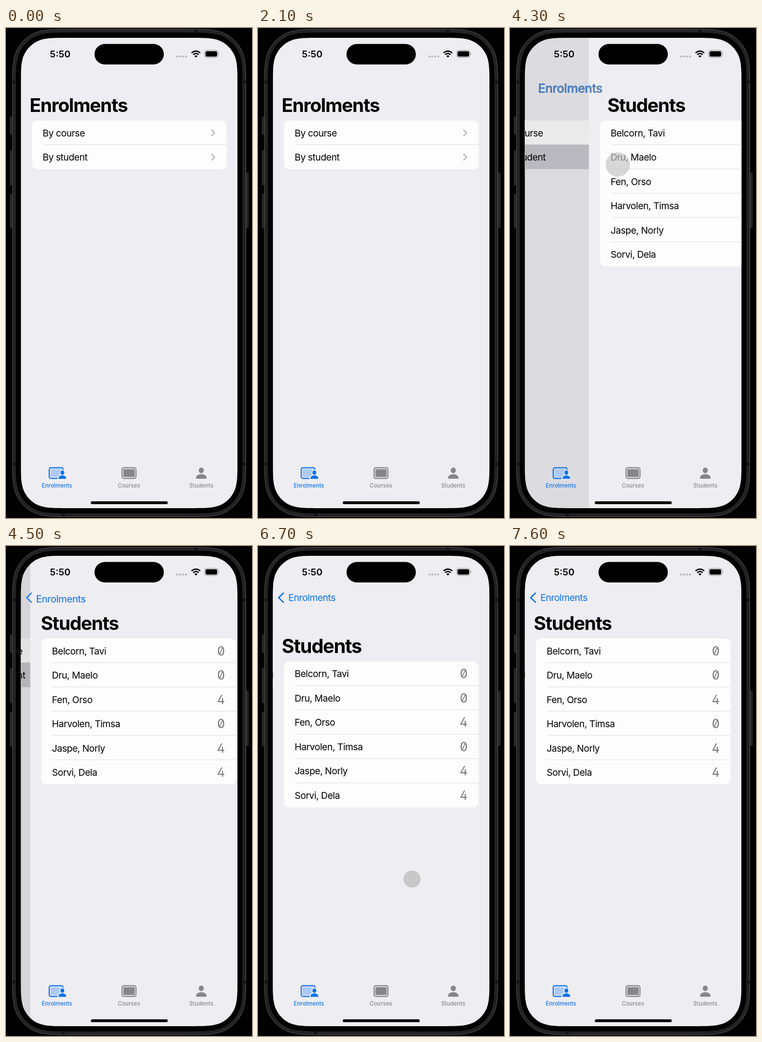
An HTML page for the animation above (8 s loop, 502 by 998 pixels).

```html
<!DOCTYPE html>
<html lang="en">
<head>
<meta charset="utf-8">
<title>Enrolments</title>
<style>
  html, body { margin: 0; width: 100%; height: 100%; overflow: hidden; background: #000; }
  svg { display: block; width: 502px; height: 998px; }
  text { font: 400 19.1px Inter, "Open Sans", sans-serif; font-optical-sizing: none; letter-spacing: -.5px; }
  .large { font-size: 38.2px; font-weight: 700; letter-spacing: -1.22px; }
  .clock { font-weight: 600; letter-spacing: 0; }
  .tab { font-size: 11.25px; font-weight: 500; letter-spacing: .15px; text-anchor: middle; }
  .count { font-size: 25px; fill: #77777a; text-anchor: middle; letter-spacing: 0; font-feature-settings: "zero", "cv02"; }
  .line { fill: none; stroke-linecap: round; stroke-linejoin: round; }
</style>
</head>
<body>
<svg id="stage" viewBox="0 0 502 998"></svg>
<script>
const LOOP = 8000, STEP = 100;
const BG = '#eeedf2', BLUE = '#0a72ea', GRAY = '#868689';
const SCREEN = { x: 30.3, y: 20, w: 442, h: 958 };
const ROW = 49.5, LIST_TOP = 188.5;
const students = [
  ['Belcorn, Tavi', 0], ['Dru, Maelo', 0], ['Fen, Orso', 4],
  ['Harvolen, Timsa', 0], ['Jaspe, Norly', 4], ['Sorvi, Dela', 4],
];

const rect = (x, y, w, h, r, fill, extra = '') =>
  `<rect x="${x}" y="${y}" width="${w}" height="${h}" rx="${r}" fill="${fill}" ${extra}/>`;
const label = (x, y, str, cls = '', fill = '#000') =>
  `<text x="${x}" y="${y}" class="${cls}" fill="${fill}">${str}</text>`;
const line = (d, color, width, extra = '') =>
  `<path class="line" d="${d}" stroke="${color}" stroke-width="${width}" ${extra}/>`;

// Rectangle with continuous-curvature corners; each corner is mirrored from one curve.
function squircle(x, y, w, h, r, fill, extra = '') {
  const far = 1.528 * r;
  const corner = (cx, cy, sx, sy, flip) => {
    const p = (a, b) => `${cx + sx * r * a} ${cy + sy * r * b}`;
    const at = (a, b) => flip ? p(b, a) : p(a, b);
    return `L${at(1.528, 0)}C${at(1.088, 0)} ${at(.868, 0)} ${at(.631, .075)}` +
      `C${at(.373, .169)} ${at(.169, .373)} ${at(.075, .631)}` +
      `C${at(0, .868)} ${at(0, 1.088)} ${at(0, 1.528)}`;
  };
  const d = `M${x + far} ${y}` + corner(x + w, y, -1, 1, false) + corner(x + w, y + h, -1, -1, true) +
    corner(x, y + h, 1, -1, false) + corner(x, y, 1, 1, true);
  return `<path d="${d}Z" fill="${fill}" ${extra}/>`;
}

function list(names, accessory, behind = '') {
  const rows = names.map((name, i) => {
    const top = LIST_TOP + i * ROW;
    const divider = i ? rect(75.5, top - 1, 374.5, 1, 0, '#dcdcdf') : '';
    return divider + label(74.7, top + 32, name) + accessory(top, i);
  });
  return rect(53, LIST_TOP, 397, names.length * ROW, 11, '#fdfdfd') + behind + rows.join('');
}

const page = content => rect(SCREEN.x, SCREEN.y, SCREEN.w, SCREEN.h, 0, BG) + content;
const chevron = top => line(`M419.8 ${top + 19.2}l5.8 5.8l-5.8 5.8`, '#b9b9bd', 2.5);
const count = (top, i) => label(419.8, top + 34, students[i][1], 'count');

const person = (x, y, scale, color, extra = '') =>
  `<g transform="translate(${x} ${y}) scale(${scale})" fill="${color}" ${extra}>
    <ellipse cy="-17" rx="5.2" ry="5.8"/>
    <path d="M-9.3 0Q-10.8 0-10.8-1.5C-10.8-6-6-9.3 0-9.3S10.8-6 10.8-1.5Q10.8 0 9.3 0Z"/>
  </g>`;

function phone() {
  const side = (x, y, h) => rect(x, y, 7, h, 1.5, '#242424', 'stroke="#3d3d3d" stroke-width=".8"');
  const bands = [[13.5, 107, 6, 6], [483.5, 107, 6, 6], [13.5, 885, 6, 6],
    [483.5, 885, 6, 6], [384, 3, 6, 6], [114, 989, 6, 6]];
  return side(8.5, 181, 36) + side(8.5, 249.5, 70) + side(8.5, 338.5, 69) + side(487.5, 295.5, 111) +
    squircle(13.2, 2.5, 476.3, 993, 79, '#222', 'stroke="#595959"') +
    bands.map(b => rect(...b, 0, '#111')).join('') +
    squircle(19.5, 8.8, 463.7, 980.4, 73, '#000', 'stroke="#333" stroke-width=".8"');
}

function statusBar() {
  const dots = [0, 1, 2, 3].map(i => rect(347.5 + i * 6, 56, 4, 4, 1.6, '#b9b9bd')).join('');
  const wifi = `<path d="M387.5 60.3l-3.1-3.3q3.1-2.6 6.2 0Z"/>` +
    line('M381.9 54.2q5.6-4.6 11.2 0', '#000', 2.6, 'style="stroke-linecap:butt"') +
    line('M378.6 50.7q8.9-7.2 17.8 0', '#000', 2.6, 'style="stroke-linecap:butt"');
  const battery = rect(405.3, 45.3, 27.5, 14.8, 4.8, 'none', 'stroke="#98989c" stroke-width="1.1"') +
    rect(407.2, 47.2, 23.7, 11, 3.2, '#000') +
    '<path d="M434.2 50.2q2.4 2.5 0 5Z" fill="#98989c"/>';
  return label(89.5, 60, '5:50', 'clock') + rect(180.6, 32.6, 141.5, 41.6, 20.8, '#000') + dots + wifi + battery;
}

function tabBar() {
  const board = (x, color, inner) =>
    rect(x + 1.2, 895.7, 28.4, 21.6, 3.4, 'none', `stroke="${color}" stroke-width="2.2"`) +
    rect(x + 3.8, 898.4, 23.2, 16.2, 1.2, inner);
  return board(87, BLUE, '#abcaf5') +
    person(115, 918.2, .74, BG, `stroke="${BG}" stroke-width="5.5"`) +
    person(115, 918.2, .74, BLUE) +
    board(235.6, GRAY, GRAY) + person(398.5, 918, 1, GRAY) +
    label(104, 936, 'Enrolments', 'tab', BLUE) +
    label(251, 936, 'Courses', 'tab', GRAY) +
    label(398.5, 936, 'Students', 'tab', GRAY) +
    rect(173, 964, 157, 5.8, 2.9, '#000');
}

const stage = document.getElementById('stage');
const pressedRow = '<path id="pressed" d="M53 238h397v38.5a11 11 0 0 1-11 11h-375a11 11 0 0 1-11-11z" fill="#c9c8ce"/>';
stage.innerHTML =
  `<clipPath id="screen">${squircle(SCREEN.x, SCREEN.y, SCREEN.w, SCREEN.h, 62, '#fff')}</clipPath>` +
  phone() +
  `<g clip-path="url(#screen)">
    <g id="home">${page(list(['By course', 'By student'], chevron, pressedRow))}</g>
    ${rect(SCREEN.x, SCREEN.y, SCREEN.w, SCREEN.h, 0, '#000', 'id="dim"')}
    <g id="detail">${page(`<g id="scroll">${list(students.map(s => s[0]), count)}</g>`)}</g>
    <g id="homeTitle">${label(0, 0, 'Enrolments', 'large')}</g>
    <g id="back">${label(0, 0, 'Enrolments', '', BLUE)}</g>
    ${line('M51.8 96l-9.6 9.3l9.6 9.3', BLUE, 2.7, 'id="backArrow"')}
    <g id="detailTitle">${label(0, 0, 'Students', 'large')}</g>
    ${tabBar()}${statusBar()}
    <circle id="touch"/>
  </g>`;

const parts = {};
stage.querySelectorAll('[id]').forEach(el => parts[el.id] = el);
const set = (id, attrs) => {
  for (const key in attrs) parts[id].setAttribute(key, attrs[key]);
};

const clamp = v => Math.min(1, Math.max(0, v));
const mix = (a, b, v) => a + (b - a) * v;
const smooth = v => v * v * (3 - 2 * v);
// Critically damped spring: the share of the distance still to go.
const remaining = (ms, rate) => {
  const x = Math.max(0, ms) / 1000 * rate;
  return (1 + x) * Math.exp(-x);
};
const rubberBand = d => SCREEN.h * (1 - 1 / (1 + .55 * Math.max(0, d - 16) / SCREEN.h));

const PUSH = 4100, DRAG = 6300, RELEASE = 6800;
const pushed = (t, delay) => t >= 4950 ? 1 : 1 - remaining(t - PUSH - delay, 12.3);
const fingerDrag = t => 118 * smooth(clamp((t - DRAG) / (RELEASE - DRAG)));
const pull = t => t >= 7600 ? 0 : rubberBand(fingerDrag(t)) * remaining(t - RELEASE, 10);

// [from, until, finger is firmly down]
const touches = [
  [3600, 3700, false], [3700, 3900, true], [3900, 4400, false],
  [6100, 6200, false], [6200, 6900, true], [6900, 7100, false],
];

function drawTouch(t) {
  const phase = touches.find(([from, until]) => t >= from && t < until);
  if (!phase) return set('touch', { opacity: 0 });
  const drag = fingerDrag(t), down = phase[2];
  const [x, y] = t < 5000 ? [220, 278] : [308.6 + drag * .054, 572.6 + drag];
  set('touch', { cx: x, cy: y, r: down ? 17.5 : 24.8, fill: down ? '#c8c8c9' : '#c6c6c7', opacity: down ? 1 : .68 });
}

function draw(t) {
  const slide = pushed(t, 0), nav = pushed(t, 16), offset = pull(t);
  const spot = `translate(${mix(48.2, 62, nav)} ${mix(171, 112, nav)})`;
  const scale = mix(1, .48, nav);

  set('pressed', { opacity: t >= PUSH ? 1 : 0 });
  set('home', { transform: `translate(${-.3 * SCREEN.w * slide})` });
  set('dim', { opacity: .107 * slide });
  set('detail', { transform: `translate(${SCREEN.w * (1 - slide)})` });
  set('scroll', { transform: `translate(0 ${offset})` });
  set('homeTitle', { transform: `${spot} scale(${scale})`, opacity: 1 - nav });
  set('back', { transform: `${spot} scale(${scale / .48})`, opacity: nav });
  set('backArrow', { opacity: clamp((nav - .7) / .3) });
  set('detailTitle', {
    transform: `translate(${48.6 + SCREEN.w * (1 - nav)} ${171 + offset}) scale(${1 + offset * .00053})`,
  });
  drawTouch(t);
}

const start = performance.now();
let last = -1;
function tick() {
  const t = Math.floor((performance.now() - start) % LOOP / STEP) * STEP;
  if (t !== last) draw(last = t);
  requestAnimationFrame(tick);
}
tick();
</script>
</body>
</html>
```
